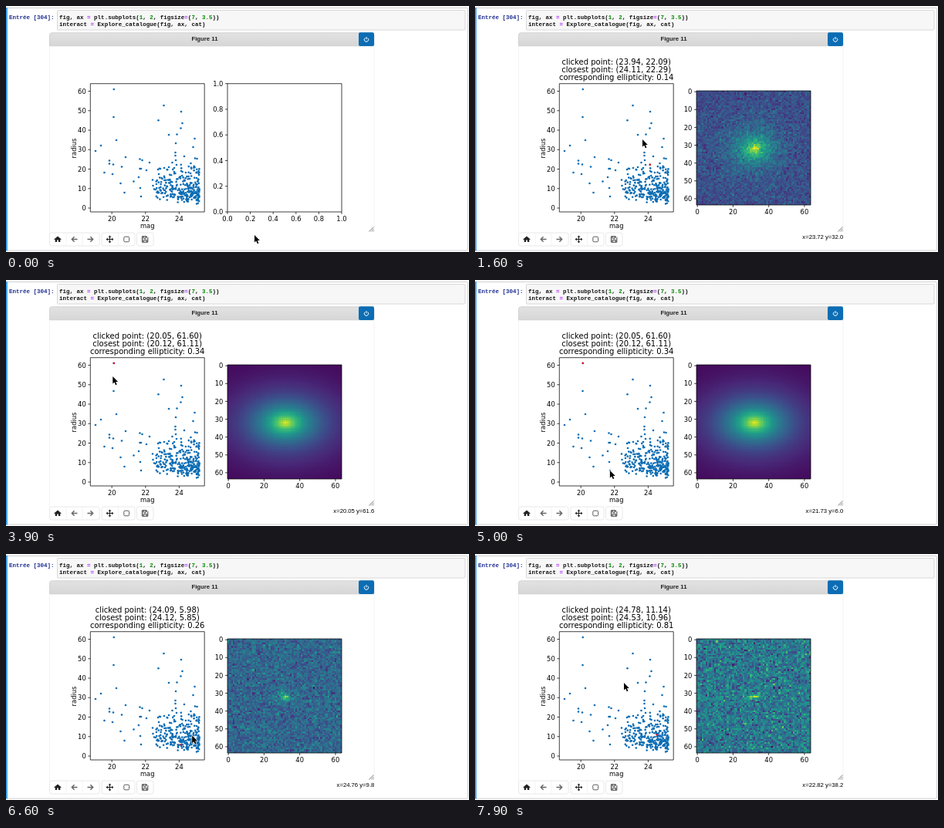
These frames come from a looping animation (600x319 px, 8000 ms). An HTML page with a canvas:

```html
<!DOCTYPE html>
<html lang="fr">
<head>
<meta charset="utf-8">
<title>Catalogue explorer</title>
<style>
html, body { margin: 0; width: 100%; height: 100%; overflow: hidden; background: #fff; }
canvas { display: block; width: 600px; height: 319px; }
</style>
</head>
<body>
<canvas id="stage"></canvas>
<script>
const LOOP = 8000, STEP = 100;
const BLUE = '#0c6db4';
const PLOT = '"DejaVu Sans", sans-serif';
const UI = '"Liberation Sans", Arial, sans-serif';
const CODE = 'bold 7.53px "Liberation Mono", monospace';

const stage = document.getElementById('stage');
const dpr = window.devicePixelRatio || 1;
stage.width = 600 * dpr;
stage.height = 319 * dpr;
const c = stage.getContext('2d');

// Data to pixels in the scatter plot
const toX = mag => 137.2 + (mag - 20) * 21.8;
const toY = radius => 262 - radius * 2.525;

function seeded(seed) {
  return () => {
    seed = (seed + 0x6D2B79F5) | 0;
    let v = Math.imul(seed ^ (seed >>> 15), 1 | seed);
    v = (v + Math.imul(v ^ (v >>> 7), 61 | v)) ^ v;
    return ((v ^ (v >>> 14)) >>> 0) / 4294967296;
  };
}
const gauss = rnd => Math.sqrt(-2 * Math.log(1 - rnd())) * Math.cos(6.2832 * rnd());

// Outlying points in pixels; the dense cluster is random
const dots = [
  [139.8, 108], [139.5, 144], [143, 174], [116, 188], [123, 181], [134, 200.5], [134, 204.5],
  [139, 205.5], [127.5, 216], [138, 218], [150, 208.5], [155, 196], [148.5, 230], [153.5, 242],
  [165.5, 227.5], [172, 222], [173.5, 198.5], [176.5, 200], [186, 203], [173.5, 211], [175, 211],
  [174, 236], [175, 247], [182, 213], [190, 225.5], [190.5, 233], [192, 237.5], [197.5, 148.2],
  [204.5, 129], [227, 137], [228.5, 152], [226.5, 158.5], [211, 167], [221.5, 166.5], [220, 178],
  [244.5, 172], [242.5, 183], [219.5, 190], [219.5, 194], [231, 195], [245, 197.5], [247.5, 198],
  [220, 200], [215.5, 203], [239.5, 204], [200, 211], [197, 212], [198, 218], [205, 210],
  [211, 209], [218, 210], [221, 206], [226.8, 205.7], [240, 209.5], [227, 214], [218, 215],
  [227, 247.2], [235.9, 234.3]
];
const rnd = seeded(11);
for (let i = 0; i < 265; i++) {
  const u = Math.pow(rnd(), 1.45);
  const r = Math.exp(2.13 + 0.25 * u + (0.56 - 0.22 * u) * gauss(rnd));
  dots.push([250.5 - 57 * u, toY(Math.min(Math.max(r, 1.3 + 3 * u), 19 + 3 * rnd()))]);
}

const VIRIDIS = [[68, 1, 84], [72, 40, 120], [62, 73, 137], [49, 104, 142], [38, 130, 142],
  [31, 158, 137], [53, 183, 121], [109, 205, 89], [180, 222, 44], [253, 231, 37]];

function galaxy({ size, ell, sky, noise }, seed) {
  const img = document.createElement('canvas');
  img.width = img.height = 64;
  const g = img.getContext('2d'), data = g.createImageData(64, 64), rnd = seeded(seed);
  for (let i = 0; i < 4096; i++) {
    const r = Math.hypot(i % 64 - 32, ((i >> 6) - 32) / (1 - ell));
    let v = sky + (0.98 - sky) * Math.exp(-r / size) + noise * gauss(rnd);
    v = Math.min(Math.max(v, 0), 1) * 9;
    const k = Math.min(Math.floor(v), 8);
    for (let j = 0; j < 3; j++)
      data.data[i * 4 + j] = VIRIDIS[k][j] + (v - k) * (VIRIDIS[k + 1][j] - VIRIDIS[k][j]);
    data.data[i * 4 + 3] = 255;
  }
  g.putImageData(data, 0, 0);
  return img;
}

const clicks = [
  { at: 1100, click: [23.94, 22.09], near: [24.11, 22.29], ell: 0.14, size: 7, sky: 0.24, noise: 0.055 },
  { at: 2300, click: [22.75, 44.85], near: [22.76, 45.28], ell: 0.36, size: 13, sky: 0.045, noise: 0.014 },
  { at: 3700, click: [20.05, 61.60], near: [20.12, 61.11], ell: 0.34, size: 16, sky: 0, noise: 0.001 },
  { at: 5100, click: [21.73, 5.98], near: [21.75, 5.94], ell: 0.08, size: 3.6, sky: 0.05, noise: 0.014 },
  { at: 5800, click: [24.09, 5.98], near: [24.12, 5.85], ell: 0.26, size: 1.9, sky: 0.33, noise: 0.075 },
  { at: 6900, click: [24.78, 11.14], near: [24.53, 10.96], ell: 0.81, size: 3.2, sky: 0.4, noise: 0.11 }
];
clicks.forEach((k, i) => k.img = galaxy(k, 40 + i));

// Pointer path: time, x, y
const path = [
  [0, 322, 297], [800, 227, 209], [900, 223.1, 206.2], [1300, 223.1, 206.2], [1500, 218.2, 181.2],
  [1600, 217, 173], [2000, 199, 151], [2100, 197.2, 148.8], [2700, 197.2, 148.8], [3300, 141, 110],
  [3400, 138.3, 106.5], [3800, 138.3, 106.5], [3900, 138.3, 125], [4500, 172, 243],
  [4700, 174.9, 246.9], [5200, 174.9, 246.9], [5700, 226.4, 246.9], [6100, 226.4, 246.9],
  [6500, 241, 237.3], [6700, 241.4, 233.9], [7200, 241.4, 233.9], [7600, 210, 168],
  [7800, 198.7, 165.5], [7900, 193, 167]
];
function pointer(t) {
  const i = path.findIndex(p => p[0] >= t);
  if (i < 1) return path[0].slice(1);
  const [a, b] = [path[i - 1], path[i]], u = (t - a[0]) / (b[0] - a[0]);
  return [a[1] + u * (b[1] - a[1]), a[2] + u * (b[2] - a[2])];
}

function text(s, x, y, font, align = 'left', color = '#000') {
  c.font = font;
  c.textAlign = align;
  c.fillStyle = color;
  c.fillText(s, x, y);
}

function shape(d, fill, stroke, width = 1) {
  const p = new Path2D(d);
  if (fill) { c.fillStyle = fill; c.fill(p); }
  if (stroke) { c.strokeStyle = stroke; c.lineWidth = width; c.stroke(p); }
}

function box(x, y, w, h, radius, fill, stroke) {
  c.beginPath();
  c.roundRect(x, y, w, h, radius);
  if (fill) { c.fillStyle = fill; c.fill(); }
  if (stroke) { c.strokeStyle = stroke; c.lineWidth = 0.8; c.stroke(); }
}

function codeLine(x, y, parts) {
  for (const [s, color] of parts) {
    text(s, x, y, CODE, 'left', color);
    x += c.measureText(s).width;
  }
}

// Frame with ticks; each tick is [position, label]
function axes(x, y, w, h, xs, ys) {
  const font = '8.35px ' + PLOT;
  let d = `M${x} ${y}h${w}v${h}h${-w}z`;
  for (const [p, s] of xs) {
    d += `M${p} ${y + h}v2.9`;
    text(s, p, y + h + 11.8, font, 'center');
  }
  for (const [p, s] of ys) {
    d += `M${x} ${p}h-2.9`;
    text(s, x - 5.6, p + 3.1, font, 'right');
  }
  shape(d, null, '#000', 0.75);
}

function dot(x, y, color) {
  c.fillStyle = color;
  c.beginPath();
  c.arc(x, y, 1.3, 0, 7);
  c.fill();
}

function page() {
  c.fillStyle = '#fff';
  c.fillRect(0, 0, 600, 319);
  box(0.5, 2.5, 598, 314.5, 1, null, '#c4c4c4');
  c.fillStyle = '#42a5f5';
  c.fillRect(0, 2, 2, 315.5);
  box(66.5, 5.5, 528.5, 25.5, 1, '#f7f7f7', '#cfcfcf');
  text('Entrée [304]:', 4, 16.5, CODE, 'left', '#1c2c90');
  const k = '#111', op = '#a2f', num = '#080';
  codeLine(69, 16.5, [['fig, ax ', k], ['=', op], [' plt.subplots(', k], ['1', num], [', ', k], ['2', num],
    [', figsize', k], ['=', op], ['(', k], ['7', num], [', ', k], ['3.5', num], ['))', k]]);
  codeLine(69, 25.5, [['interact ', k], ['=', op], [' Explore_catalogue(fig, ax, cat)', k]]);

  const bar = c.createLinearGradient(0, 35, 0, 52);
  bar.addColorStop(0, '#e2e2e2');
  bar.addColorStop(1, '#d6d6d6');
  box(56.5, 34.8, 420.5, 17, [3, 3, 0, 0], bar, '#ccc');
  text('Figure 11', 257.5, 45, 'bold 7.8px ' + UI, 'center', '#222');
  box(457, 34.3, 20, 17.7, 2, BLUE);
  shape('M465.2 41.6a2.7 2.7 0 1 0 3.6 0M467 40v3.2', null, '#fff', 1);
  shape('M56.5 52v241.5M477 52v241.5', null, '#f0f0f0', 0.8);
  shape('M470.5 292.5l6-6M473 292.5l3.5-3.5M475.3 292.5l1.2-1.2', null, '#666', 0.8);
}

function toolbar() {
  for (const [x, w] of [[56.5, 64.5], [124, 43], [169.5, 21.5]])
    box(x, 294, w, 17, 2.5, '#fff', '#e2e2e2');
  shape('M78 294v17M99 294v17M145.5 294v17', null, '#eee', 0.7);
  shape('M62.3 302.6L67 298.4l4.7 4.2-.7.7-.7-.6v3.4h-2.4v-2.7h-1.8v2.7h-2.4v-3.4l-.7.6z', '#222');
  shape('M92.5 302.5h-7M88.6 299.2l-3.3 3.3 3.3 3.3', null, '#666', 1.4);
  shape('M105.5 302.5h7M109.4 299.2l3.3 3.3-3.3 3.3', null, '#666', 1.4);
  shape('M130.5 302.5h8M134.5 298.5v8', null, '#222', 1.1);
  shape('M134.5 297.6l1.9 2.2h-3.8zM134.5 307.4l1.9-2.2h-3.8zM129.6 302.5l2.2-1.9v3.8zM139.4 302.5l-2.2-1.9v3.8z', '#222');
  box(152.8, 299.2, 6.8, 6.6, 1.4, null, '#333');
  shape('M176.5 298.8h5.6l1.7 1.7v5.7h-7.3zM178.2 298.8v2.4h3.3v-2.4M178.2 306.2v-2.8h4v2.8', null, '#222', 0.9);
}

function scatter(hit) {
  for (const [x, y] of dots) dot(x, y, BLUE);
  if (hit) dot(toX(hit.near[0]), toY(hit.near[1]), '#e8101c');
  axes(109.3, 100.7, 147.9, 166.3, [20, 22, 24].map(v => [toX(v), v]),
    [0, 10, 20, 30, 40, 50, 60].map(v => [toY(v), v]));
  const font = '8.35px ' + PLOT;
  text('mag', 183.2, 288, font, 'center');
  c.save();
  c.translate(90.5, 184.5);
  c.rotate(-Math.PI / 2);
  text('radius', 0, 0, font, 'center');
  c.restore();
  if (!hit) return;
  const pair = p => `(${p[0].toFixed(2)}, ${p[1].toFixed(2)})`;
  ['clicked point: ' + pair(hit.click), 'closest point: ' + pair(hit.near),
    'corresponding ellipticity: ' + hit.ell.toFixed(2)]
    .forEach((s, i) => text(s, 183.2, 75.6 + i * 10.35, '10.02px ' + PLOT, 'center'));
}

function preview(hit) {
  if (!hit) {
    const ticks = [0, 0.2, 0.4, 0.6, 0.8, 1];
    axes(287, 100.7, 148, 166.3, ticks.map(v => [287 + 148 * v, v.toFixed(1)]),
      ticks.map(v => [267 - 166.3 * v, v.toFixed(1)]));
    return;
  }
  const px = 148 / 64;
  c.imageSmoothingEnabled = false;
  c.drawImage(hit.img, 287, 110, 148, 148);
  axes(287, 110, 148, 148, [0, 20, 40, 60].map(v => [287 + (v + 0.5) * px, v]),
    [0, 10, 20, 30, 40, 50, 60].map(v => [110 + (v + 0.5) * px, v]));
}

function readout([x, y]) {
  if (x < 109 || x > 257 || y < 101 || y > 267) return;
  const mag = 20 + (x - 137.2) / 21.8, radius = (262 - y) / 2.525;
  text(`x=${mag.toFixed(2)} y=${radius.toFixed(1)}`, 477.3, 302, '7.7px ' + UI, 'right');
}

function arrow([x, y]) {
  c.save();
  c.translate(x, y);
  c.lineJoin = 'round';
  shape('M0 0V9.6L2.2 7.6 3.8 11.2 5.4 10.5 3.9 7H6.8Z', '#000', '#fff', 1.2);
  shape('M0 0V9.6L2.2 7.6 3.8 11.2 5.4 10.5 3.9 7H6.8Z', '#000');
  c.restore();
}

function draw(now) {
  const t = Math.floor((now % LOOP) / STEP) * STEP;
  const hit = clicks.filter(k => k.at <= t).pop();
  c.setTransform(dpr, 0, 0, dpr, 0, 0);
  page();
  toolbar();
  scatter(hit);
  preview(hit);
  readout(pointer(t - STEP)); // the readout trails the pointer by one step
  arrow(pointer(t));
}

let start;
function tick(now) {
  start ??= now;
  draw(now - start);
  requestAnimationFrame(tick);
}
draw(0);
requestAnimationFrame(tick);
</script>
</body>
</html>
```
